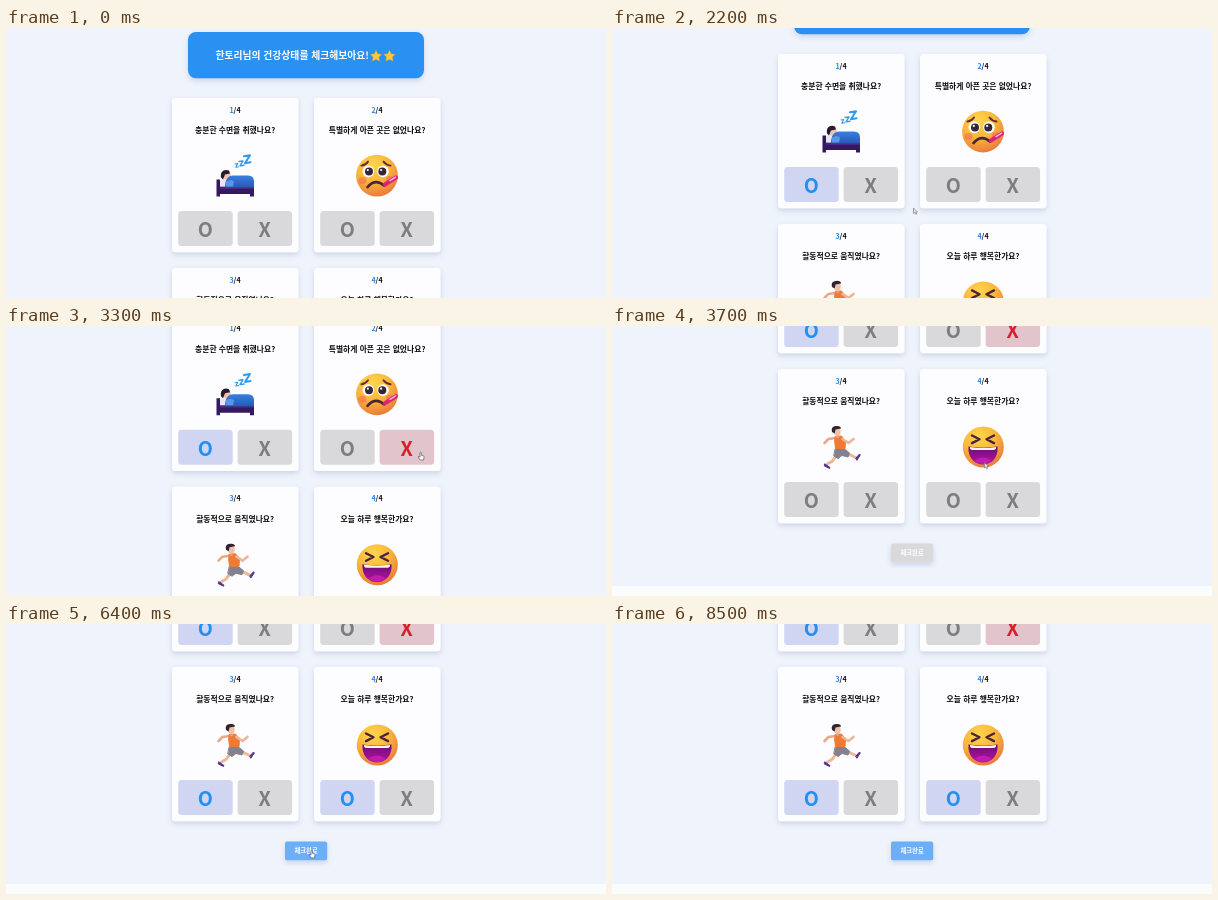
An HTML page that plays this animation: 600 px wide and 270 px high, repeating every 8600 ms.

```html
<!DOCTYPE html>
<html lang="ko">
<head>
<meta charset="utf-8">
<title>건강상태 체크</title>
<style>
html, body { margin: 0; width: 100%; height: 100%; overflow: hidden; background: #eef3fc; }
svg { display: block; width: 600px; height: 270px; }
text { font-family: "Noto Sans CJK KR", "Noto Sans CJK", "Noto Sans CJK JP", sans-serif; font-weight: 700; text-anchor: middle; }
</style>
</head>
<body>
<svg id="stage" viewBox="0 0 600 270">
  <defs>
    <filter id="shadow" x="-20%" y="-20%" width="140%" height="150%">
      <feDropShadow dx="0" dy="2.5" stdDeviation="2.5" flood-color="#51678c" flood-opacity=".22"/>
    </filter>
    <radialGradient id="face" cx=".4" cy=".25" r=".8">
      <stop offset="0" stop-color="#ffd64c"/><stop offset=".5" stop-color="#f9b73b"/><stop offset="1" stop-color="#e8743c"/>
    </radialGradient>
    <linearGradient id="mouth" x1="0" y1="0" x2="0" y2="1">
      <stop offset="0" stop-color="#6d0d72"/><stop offset="1" stop-color="#b514a6"/>
    </linearGradient>
    <linearGradient id="quilt" x1="0" y1="0" x2="0" y2="1">
      <stop offset="0" stop-color="#3a80e0"/><stop offset="1" stop-color="#2659b8"/>
    </linearGradient>

    <g id="bed">
      <path d="M.5 25h3.5v7h34v10h-4v-2.5h-30V42H.5z" fill="#35195f"/>
      <path d="M4 32h34v2.5H4z" fill="#4a277d"/>
      <path d="M4 26l6-3 5 3v6H4z" fill="#e9e6f4"/>
      <ellipse cx="10.5" cy="20.5" rx="4.3" ry="4.6" fill="#f0c4ae"/>
      <path d="M5 23c-1-6 3-9 8-7l1 3-5 1-2 5z" fill="#271b2b"/>
      <path d="M9 33c0-8 3-12 8-12h15q6 0 6 6v6z" fill="url(#quilt)"/>
      <path d="M10 27q5-3 8 0l-1 5h-7z" fill="#5c95e6"/>
      <g fill="none" stroke="#2e9aef" stroke-linejoin="round" stroke-linecap="round">
        <path d="M28 1.8l6-1-5 8 5.5-1" stroke-width="2"/>
        <path d="M23 7l4-.6-3 5 4-.6" stroke-width="1.4"/>
        <path d="M19 9.5l2.8-.4-2 3.6 2.7-.4" stroke-width="1.1"/>
      </g>
    </g>

    <g id="sick">
      <circle cx="21" cy="21" r="20.9" fill="url(#face)"/>
      <ellipse cx="6.5" cy="26" rx="4" ry="3.5" fill="#f2665f" opacity=".55"/>
      <ellipse cx="34" cy="25" rx="4" ry="3.5" fill="#f2665f" opacity=".55"/>
      <path d="M5.5 11q4-.5 6.500-4M27.500 7q3 3.500 7 4" fill="none" stroke="#632c3b" stroke-width="1.9" stroke-linecap="round"/>
      <circle cx="12.300" cy="16.800" r="5.800" fill="#fff"/><circle cx="27" cy="16.800" r="5.800" fill="#fff"/>
      <circle cx="13" cy="17" r="4" fill="#36253a"/><circle cx="26.300" cy="17" r="4" fill="#36253a"/>
      <circle cx="11.800" cy="15.400" r="1.100" fill="#fff"/><circle cx="25.100" cy="15.400" r="1.100" fill="#fff"/>
      <path d="M11.500 32.500q8-9 16.500-1.500" fill="none" stroke="#4b2438" stroke-width="2.700" stroke-linecap="round"/>
      <path d="M29 30l11-7" stroke="#dd2379" stroke-width="4.200" stroke-linecap="round"/>
      <path d="M34 26l5.500-3.500" stroke="#f6b9da" stroke-width="1.500" stroke-linecap="round"/>
    </g>

    <g id="runner" fill="none" stroke-linecap="round" stroke-linejoin="round">
      <path d="M13 12l-7 1-4 4" stroke="#e9a98b" stroke-width="2.600"/>
      <path d="M14 29l-4 6-5 3" stroke="#edb697" stroke-width="3"/>
      <path d="M24 28l4 1 6 3" stroke="#edb697" stroke-width="3"/>
      <path d="M2.500 38l5 3.500-.5 1-5-2.500zM33.500 32l3.500-4 .8 1-3.300 5z" fill="#51338f" stroke="#51338f"/>
      <path d="M13 23h9l5 4-1.500 4-6-1.500-4 3-4-2.500z" fill="#83818e" stroke="#83818e"/>
      <path d="M13 10.500l6-.5 4 5-.5 7.500H13l-.8-7z" fill="#f07a34" stroke="#f07a34"/>
      <path d="M20 13l6 4 5-4" stroke="#edb697" stroke-width="2.700"/>
      <path d="M15 8v3" stroke="#e6a584" stroke-width="2.700"/>
      <ellipse cx="14.800" cy="5.500" rx="3.400" ry="4.300" fill="#f1c1a4"/>
      <path d="M9.500 6Q8 .5 13.500 0q5-.5 5 2.500l-5.500 1-.8 4z" fill="#312333"/>
    </g>

    <g id="laugh">
      <circle cx="20.800" cy="21" r="20.500" fill="url(#face)"/>
      <path d="M9.500 9.500l7.500 3.800-7.500 3.800M31.500 9.500l-7.500 3.800 7.500 3.800" fill="none" stroke="#4b2337" stroke-width="2.400" stroke-linecap="round" stroke-linejoin="round"/>
      <path d="M6 20.500q14.500 2 29 0c1 10-5 18-14.500 18S5 30.500 6 20.500z" fill="url(#mouth)"/>
      <path d="M7.500 20.900q13 1.800 26 0v1.600q-1 1.500-3 1.500h-20q-2.500 0-3-1.500z" fill="#fbf3fa"/>
      <path d="M12 34.500q8.500-6 17 0-8.500 6.500-17 0z" fill="#c21cae"/>
    </g>

    <path id="star" d="M0-5.600l1.700 3.500 3.800.5-2.700 2.700.7 3.900L0 3.200l-3.500 1.800.7-3.900-2.700-2.700 3.800-.5z" fill="#ffc83d" stroke="#f7ac2c" stroke-width=".4" stroke-linejoin="round"/>
  </defs>
  <rect width="600" height="270" fill="#eef3fc"/>
  <g id="page"></g>
  <g id="cursor" stroke-linejoin="round">
    <path id="hand" fill="#fff" stroke="#444" stroke-width=".6" d="M-1-3.400q.7-.7 1.300 0V-.7l2 .5q1 .3.700 1.400L2.600 4H-.8l-2-2.900q0-1 .9-.6l.9.700z"/>
    <path id="arrow" fill="#e4e6ea" stroke="#666" stroke-width=".55" d="M-1.500-3v5.600l1.300-1.200 1 2 .9-.5-.9-1.800h1.700z"/>
  </g>
</svg>
<script>
const LOOP = 8600;
const $ = id => document.getElementById(id);
const page = $("page");

function add(parent, tag, attrs, label) {
  const el = document.createElementNS("http://www.w3.org/2000/svg", tag);
  for (const key in attrs) el.setAttribute(key, attrs[key]);
  if (label) el.textContent = label;
  parent.appendChild(el);
  return el;
}

const box = (parent, x, y, width, height, rx, fill, more) =>
  add(parent, "rect", { x, y, width, height, rx, fill, ...more });
const write = (parent, x, y, size, fill, label) =>
  add(parent, "text", { x, y, "font-size": size, fill }, label);
const shadow = { filter: "url(#shadow)" };

const GREY = ["#d9d9db", "#7d7d80"];
const BLUE = ["#d0d6f1", "#248ef1"];
const RED = ["#e2c5cc", "#d3212e"];

function choice(parent, x, label) {
  return {
    back: box(parent, x, 113, 54.5, 35, 3.5, GREY[0]),
    mark: write(parent, x + 27.2, 139, 19.7, GREY[1], label)
  };
}

function card(x, y, number, question, art, artX, artY) {
  const g = add(page, "g", { transform: `translate(${x} ${y})` });
  box(g, 0, 0, 126.5, 154.3, 3.5, "#fdfdff", shadow);
  const count = write(g, 63, 14.6, 7.1, "#111", "");
  add(count, "tspan", { fill: "#2c82dc" }, String(number));
  add(count, "tspan", {}, "/4");
  write(g, 63.1, 35.2, 7.8, "#0c0c0c", question);
  add(g, "use", { href: "#" + art, x: artX, y: artY });
  return { O: choice(g, 6.2, "O"), X: choice(g, 65.6, "X") };
}

box(page, 0, 457, 600, 30, 0, "#fbfcfe");
box(page, 182, 4, 236, 46.3, 8, "#2990f2", shadow);
write(page, 286.2, 31.2, 9.8, "#fff", "한토리님의 건강상태를 체크해보아요!");
for (const x of [370, 383.5]) add(page, "use", { href: "#star", x, y: 28 });

const cards = [
  card(166, 70, 1, "충분한 수면을 취했나요?", "bed", 44, 56.5),
  card(308, 70, 2, "특별하게 아픈 곳은 없었나요?", "sick", 42, 56.6),
  card(166, 240, 3, "활동적으로 움직였나요?", "runner", 44.5, 57),
  card(308, 240, 4, "오늘 하루 행복한가요?", "laugh", 42.5, 57)
];
const done = box(page, 279, 414.6, 42.2, 18.6, 2, "#d9d9db", shadow);
write(page, 300.1, 426.2, 6.3, "#fff", "체크완료");

// card, answer, time of the click, colours
const answers = [
  [0, "O", 1500, BLUE], [1, "X", 3100, RED],
  [2, "O", 4300, BLUE], [3, "O", 4900, BLUE]
];
const allAnswered = 4900;
const scroll = [[2000, 0], [2600, 79.3], [3340, 79.3], [3700, 197]];
const route = [
  [900, 290, 215], [1200, 205.3, 211], [1700, 205.3, 211], [2100, 303, 183],
  [2600, 303, 183], [3000, 415, 130], [3340, 415, 130], [3700, 374, 139.5],
  [4200, 203, 177], [4400, 203, 177], [4800, 343, 177], [5000, 343, 177],
  [5400, 306, 230]
];

const smooth = p => p * p * (3 - 2 * p);
const slowDown = p => 1 - (1 - p) ** 2;

function sample(keys, t, ease) {
  const last = keys[keys.length - 1];
  if (t <= keys[0][0]) return keys[0].slice(1);
  if (t >= last[0]) return last.slice(1);
  const i = keys.findIndex(k => k[0] > t);
  const a = keys[i - 1], b = keys[i];
  const p = ease((t - a[0]) / (b[0] - a[0]));
  return a.slice(1).map((v, n) => v + (b[n + 1] - v) * p);
}

function draw(t) {
  page.setAttribute("transform", `translate(0 ${-sample(scroll, t, slowDown)[0]})`);
  for (const [index, answer, at, colours] of answers) {
    const { back, mark } = cards[index][answer];
    const [fill, ink] = t >= at ? colours : GREY;
    back.setAttribute("fill", fill);
    mark.setAttribute("fill", ink);
  }
  done.setAttribute("fill", t >= allAnswered ? "#6caef7" : "#d9d9db");

  const [x, y] = sample(route, t, smooth);
  const pointing = (t >= 1100 && t < 1800) || (t >= 2900 && t < 3400) || t >= 4100;
  $("cursor").setAttribute("transform", `translate(${x} ${y})`);
  $("cursor").style.display = t >= 900 && t < 8200 ? "" : "none";
  $("hand").style.display = pointing ? "" : "none";
  $("arrow").style.display = pointing ? "none" : "";
}

const start = performance.now();
function tick() {
  const t = (performance.now() - start) % LOOP;
  draw(Math.floor(t / 100) * 100);
  requestAnimationFrame(tick);
}
draw(0);
requestAnimationFrame(tick);
</script>
</body>
</html>
```
